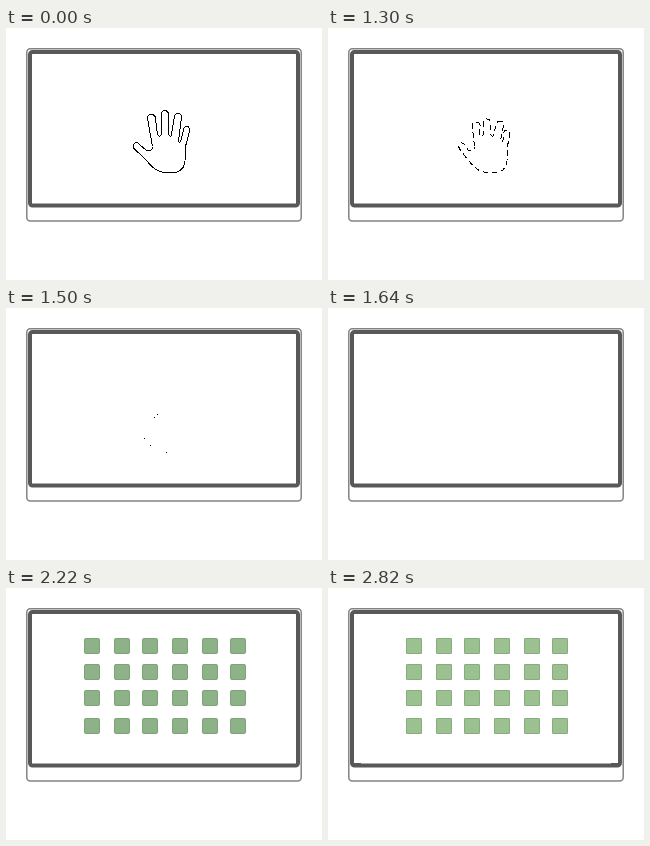
Animation of 316x252 px, one loop 3.6 s. Source, as an HTML page:

```html
<!DOCTYPE html>
<html lang="en">
<head>
<meta charset="utf-8">
<title>Hand and tiles</title>
<style>
html, body { margin: 0; width: 100%; height: 100%; overflow: hidden; background: #fff; }
svg { display: block; width: 316px; height: 252px; }
#hand { fill: none; stroke: #000; stroke-width: 1; shape-rendering: crispEdges; }
</style>
</head>
<body>
<svg viewBox="0 0 316 252">
  <rect x="20.8" y="20.8" width="274.4" height="172.2" rx="3.5" fill="#fff" stroke="#838383" stroke-width="1.5"/>
  <rect x="24" y="24" width="268" height="153.5" rx="2.5" fill="#fff" stroke="#585858" stroke-width="4"/>
  <path id="feet" d="M26 175h7v1h-7zM283 175h7v1h-7z" fill="#585858"/>
  <path id="hand"/>
  <g id="tiles"></g>
</svg>
<script>
const LOOP = 3600, STEP = 20;
const hand = document.getElementById('hand');
const tiles = document.getElementById('tiles');
const feet = document.getElementById('feet');

for (const y of [50, 76, 102, 130]) {
  for (const x of [78, 108, 136, 166, 196, 224]) {
    const r = document.createElementNS('http://www.w3.org/2000/svg', 'rect');
    const box = { x: x + .5, y: y + .5, width: 15, height: 15 };
    for (const k in box) r.setAttribute(k, box[k]);
    tiles.append(r);
  }
}

const mix = (a, b, p) => a + (b - a) * p;
const rgb = (a, b, p) => `rgb(${a.map((v, i) => Math.round(mix(v, b[i], p))).join()})`;

// Fingertip: left side, top, right side, and its shift when folded
const fingers = {
  index:  { l: [141.5, 90.5], top: [145, 86.5], r: [149.5, 90.5], move: [7, 20] },
  middle: { l: [155.5, 86.5], top: [158.5, 82.5], r: [162.5, 86.5], move: [0, 22] },
  ring:   { l: [168.5, 88.5], top: [172, 85.5], r: [175.5, 89.5], move: [0, 20] },
  pinky:  { l: [177.5, 102.5], top: [181, 98.5], r: [183.5, 103], move: [-5, 9] }
};

function tip(name, fold) {
  const { l, top, r, move } = fingers[name];
  const at = (x, y) => `${x + move[0] * fold} ${y + move[1] * fold}`;
  return `L${at(...l)}Q${at(l[0], top[1])} ${at(...top)}Q${at(r[0], top[1])} ${at(...r)}`;
}

function outline(fold) {
  const thumb = (x, y) => `${x + 9 * fold} ${y + fold}`;
  return 'M146.5 118.5' + tip('index', fold) +
    'L151.5 106.5Q153.5 110 155.5 106.5' + tip('middle', fold) +
    'L162.5 106.5Q164.5 110 165.5 106.5' + tip('ring', fold) +
    'L172.5 112.5Q173.5 116 175 112.5' + tip('pinky', fold) +
    'L179.5 118.5L179 133C178.5 140 174 144.5 167 144.5L158 144.5' +
    `C148 143 145 137 139 131L${thumb(128, 120.5)}` +
    `Q${thumb(126, 116)} ${thumb(130, 114.5)}Q${thumb(132, 114.5)} ${thumb(134, 117)}` +
    'L140 122Q143.5 124 145 122Q146.5 121 146.5 118.5';
}

function draw(t) {
  const showHand = t < 1640;
  hand.style.display = showHand ? '' : 'none';
  if (showHand) {
    const p = t < 1260 ? 0 : (Math.floor((t - 1260) / STEP) + 1) / 20;
    const left = (1 - p) ** 3;
    hand.setAttribute('d', outline(1 - left));
    hand.style.strokeDasharray = p ? `${9 * left} ${9 * (1 - left)}` : 'none';
  }

  const late = t >= 2820;
  tiles.style.display = t >= 2160 ? '' : 'none';
  feet.style.display = late ? '' : 'none';
  if (t >= 2160) {
    const q = Math.min(1, Math.floor((t - 2160) / STEP) / 4);
    tiles.style.fill = late ? '#9bc190' : rgb([125, 156, 121], [146, 185, 139], q);
    tiles.style.stroke = late ? '#87ad7f' : rgb([110, 143, 107], [130, 168, 124], q);
    for (const r of tiles.children) r.setAttribute('rx', mix(3.5, .5, q));
  }
}

function tick() {
  draw(performance.now() % LOOP);
  requestAnimationFrame(tick);
}
tick();
</script>
</body>
</html>
```
